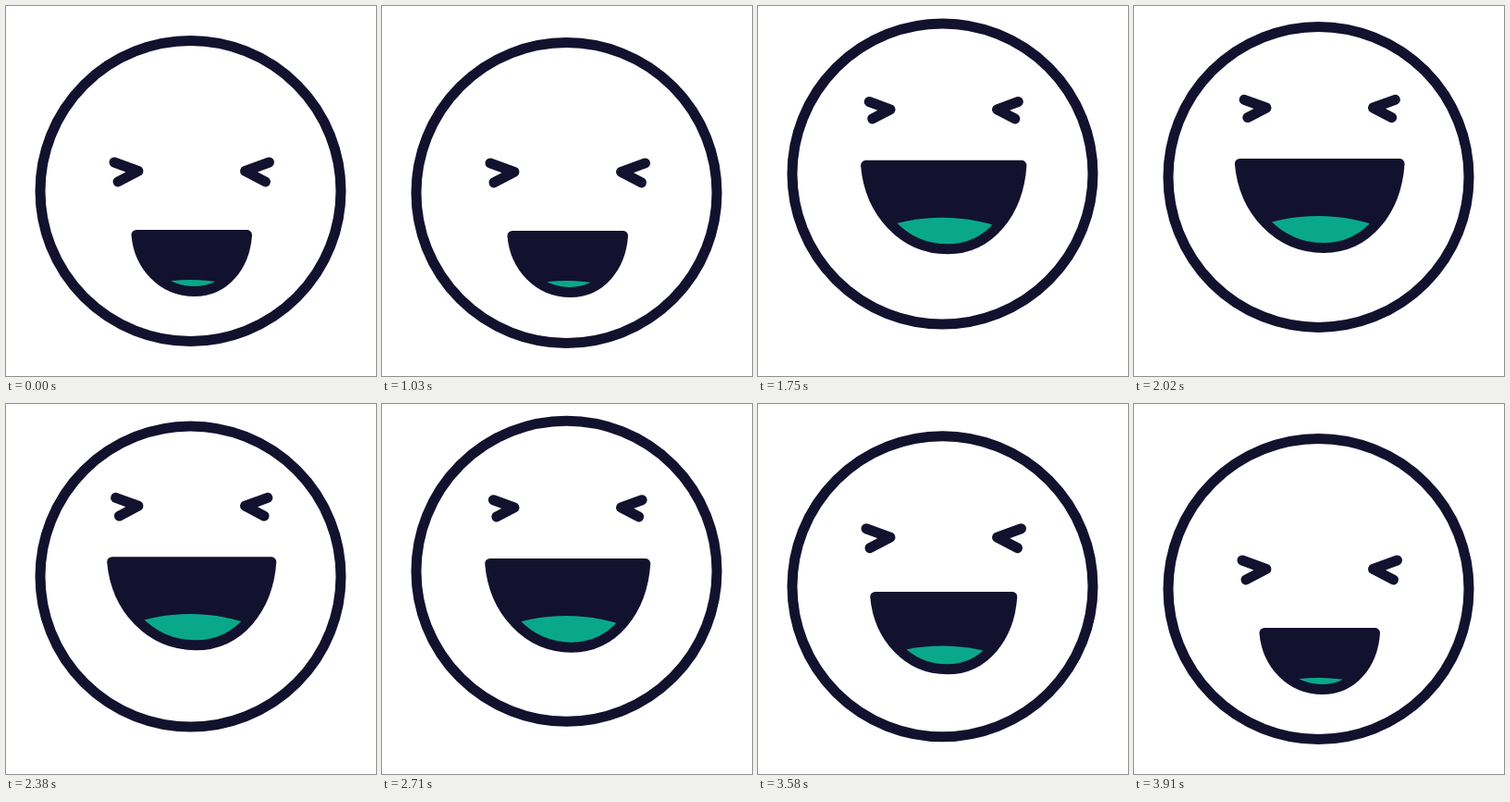
Animation of 400 by 400 pixels, one loop 3940 ms. Source, as an HTML page:

```html
<!DOCTYPE html>
<html lang="en">
<head>
<meta charset="utf-8">
<title>Laughing face</title>
<style>
  html, body { margin: 0; width: 100%; height: 100%; overflow: hidden; background: #fff; }
  svg { display: block; width: 100vw; height: 100vh; }
  .line { fill: none; stroke: #12122f; stroke-width: 11; stroke-linecap: round; stroke-linejoin: round; }
</style>
</head>
<body>
<svg viewBox="0 0 400 400">
  <clipPath id="inside"><path class="lips"/></clipPath>
  <circle id="head" class="line" cx="199.5" r="162.5"/>
  <path id="eyes" class="line"/>
  <path class="lips" fill="#12122f"/>
  <g clip-path="url(#inside)"><circle id="tongue" cx="199" r="195" fill="#0aa88a"/></g>
  <path class="lips line"/>
</svg>
<script>
const LOOP = 3940, STEP = 30;
const DIP = 1000, RISE = 1150, LAUGH = 1480, FALL = 3430, SETTLE = 3760, END = 3910;
const BOUNCE = 242, BOUNCES = 8, MID = 200.75;

const $ = id => document.getElementById(id);
const lips = document.querySelectorAll('.lips');
const clamp = (v, a, b) => Math.min(b, Math.max(a, v));
const ease = (t, a, b) => {
  const u = clamp((t - a) / (b - a), 0, 1);
  return u * u * (3 - 2 * u);
};

function pose(t) {
  const lift = ease(t, RISE, LAUGH) - ease(t, FALL, SETTLE);
  const dip = ease(t, DIP, RISE) - ease(t, SETTLE, END);
  const phase = clamp((t - LAUGH) / BOUNCE, 0, BOUNCES);
  const u = phase % 1;
  const drop = ease(1 - Math.abs(2 * u - 1), 0, 1);
  const shake = Math.sin(2 * Math.PI * (phase - 0.08)) ** 2;
  return {
    headY: 200 + 20 * dip - 40 * lift + 11 * drop,
    faceY: 9 * dip - (75.5 + 3 * shake) * lift,
    width: 130.5 + (48.5 + 7 * shake) * lift,
    height: 72 + (30 + 3.3 * shake - 5 * drop) * lift,
    lift
  };
}

function eye(dir, y, scale) {
  const tip = MID - dir * 57.75;
  const end = (dx, dy) => `${tip - dir * dx * scale} ${y + dy * scale}`;
  return `M${end(26, -9.5)}L${tip} ${y}L${end(22, 11.5)}`;
}

function mouth(top, width, height) {
  const a = width / 2, low = MID + a * 0.05;
  const p = (x, y) => `${MID + a * x} ${top + height * y} `;
  const bottom = top + height;
  return `M${p(-1, 0)}C${p(-0.95, 0.55)}${low - a * 0.58} ${bottom} ${low} ${bottom}` +
    `C${low + a * 0.55} ${bottom} ${p(0.96, 0.55)}${p(1, 0)}Z`;
}

function draw(t) {
  const { headY, faceY, width, height, lift } = pose(t);
  const squint = clamp(1 - (headY - 180) / 12, 0, 1);
  const scale = 1 - 0.14 * squint;
  const eyeY = 178.5 + faceY;
  const top = 242 + faceY - 8.5 * lift;
  const tongueTop = top + height - 18 - (height - 72) * 0.73;

  $('head').setAttribute('cy', headY);
  $('eyes').setAttribute('d', eye(1, eyeY, scale) + eye(-1, eyeY, scale));
  const d = mouth(top + 5.5, width - 11, height - 11);
  lips.forEach(el => el.setAttribute('d', d));
  $('tongue').setAttribute('cy', tongueTop + 195);
}

function tick() {
  const t = performance.now() % LOOP;
  draw(DIP + Math.floor((t - DIP) / STEP) * STEP);
  requestAnimationFrame(tick);
}
tick();
</script>
</body>
</html>
```
